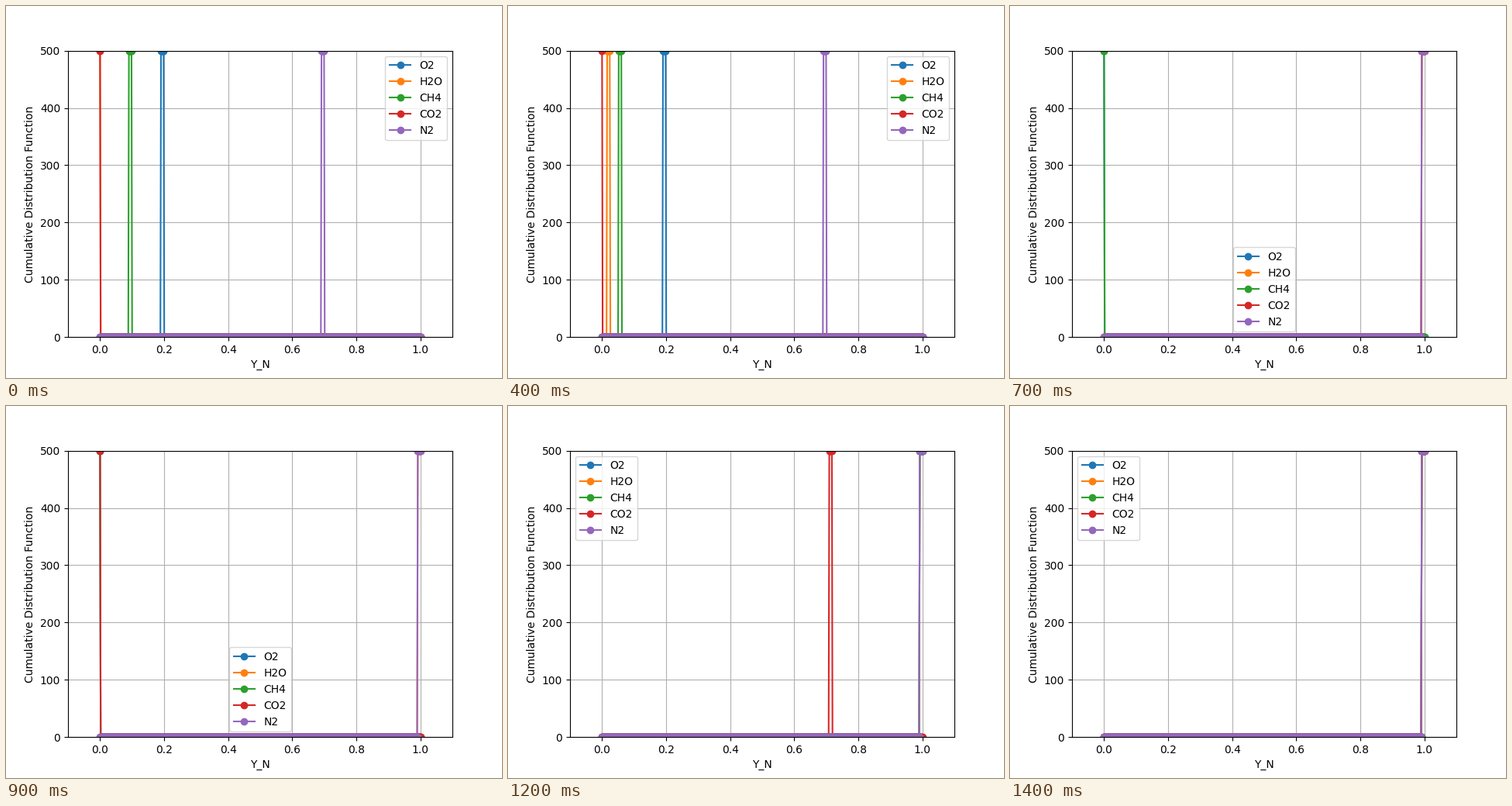
Recreate the animation shown at these times as a matplotlib script. Size 640 by 480 pixels, loop 1.5 s.

```python
import numpy as np
import matplotlib.pyplot as plt
from matplotlib.animation import FuncAnimation

STEPS = 15
STEP_MS = 100
PEAK = 500
WIDTH = 0.01
START, IGNITE, LAST_DIP = 2, 5, 9
CO2_RATE = 0.2395

x = np.linspace(0, 1, 500)


def fractions(step):
    """Mass fraction of each species at a time step."""
    if step < IGNITE:
        t = max(0, step - START)
        return {"O2": 0.2, "H2O": 0.0125 * t, "CH4": 0.1 - 0.019 * t,
                "CO2": 0, "N2": 0.7}
    # After ignition the values flip between their bounds, then saturate
    full = step > LAST_DIP or step % 2 == 0
    co2 = min(1, CO2_RATE * (step - LAST_DIP)) if step >= LAST_DIP else 1
    return {"O2": int(full or step == IGNITE), "H2O": 1, "CH4": int(full),
            "CO2": co2, "N2": 1}


def spike(y):
    """Distribution that is PEAK in the bin just below y, else zero."""
    return np.where((x >= y - WIDTH) & (x <= y), PEAK, 0)


fig, ax = plt.subplots(figsize=(6.4, 4.8), dpi=100)
lines = {name: ax.plot(x, spike(y), "-o", label=name)[0]
         for name, y in fractions(0).items()}
ax.set_xlim(-0.1, 1.1)
ax.set_ylim(0, PEAK)
ax.set_xlabel("Y_N")
ax.set_ylabel("Cumulative Distribution Function")
ax.grid(True)
ax.legend(loc="best")  # placed anew on every draw


def update(step):
    for name, y in fractions(step).items():
        lines[name].set_ydata(spike(y))
    return list(lines.values())


anim = FuncAnimation(fig, update, frames=STEPS, interval=STEP_MS,
                     repeat=True, repeat_delay=0, blit=False)
plt.show()
```
